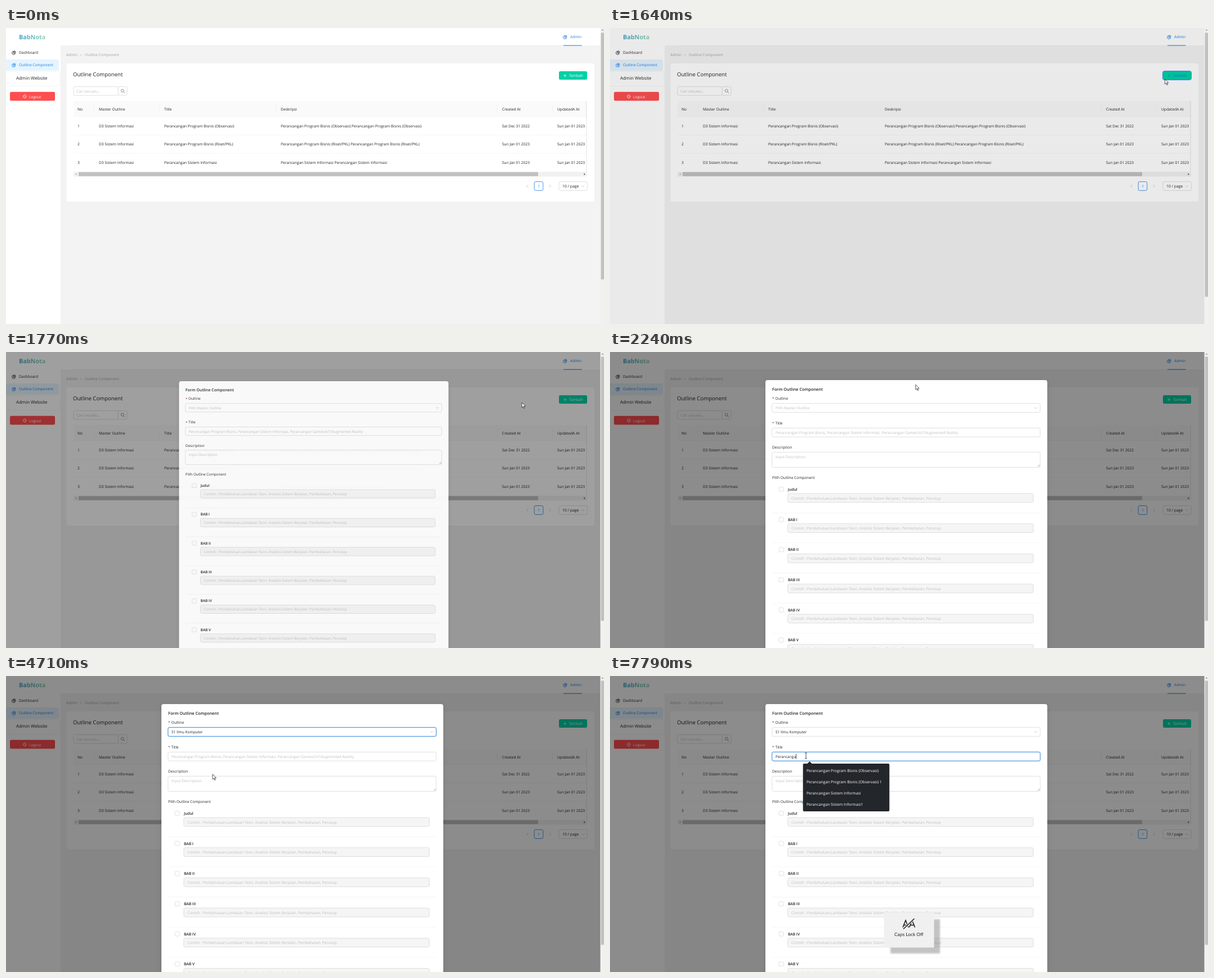
These frames come from a looping animation (1062 px wide and 527 px high, 7990 ms). An HTML page:

```html
<!DOCTYPE html>
<html lang="id">
<head>
<meta charset="utf-8">
<title>Outline Component</title>
<style>
  html, body { margin: 0; width: 100%; height: 100%; overflow: hidden; background: #fff; }
  svg { display: block; width: 100vw; height: 100vh; }
  text { font-family: "Open Sans", "Noto Sans", sans-serif; text-rendering: geometricPrecision; white-space: pre; }
</style>
</head>
<body>
<svg id="stage" viewBox="0 0 1062 527"></svg>
<script>
const LOOP = 7990;
const BLUE = '#1a7fe8', INK = '#222', FAINT = '#bfbfbf', BORDER = '#d9d9d9';

// Markup helpers; text is placed by its left edge and the middle of its capitals.
const text = (x, y, str, { size = 6.6, fill = INK, weight = 400, extra = '' } = {}) =>
  `<text x="${x}" y="${y + size * 0.36}" font-size="${size}" font-weight="${weight}" fill="${fill}" ${extra}>${str}</text>`;
const rect = (x, y, w, h, fill, r = 0, extra = '') =>
  `<rect x="${x}" y="${y}" width="${w}" height="${h}" rx="${r}" fill="${fill}" ${extra}/>`;
const outline = (x, y, w, h, stroke = BORDER, fill = '#fff', extra = '') =>
  rect(x, y, w, h, fill, 2.5, `stroke="${stroke}" stroke-width=".8" ${extra}`);
const path = (d, stroke, width = 0.8, fill = 'none') =>
  `<path d="${d}" stroke="${stroke}" stroke-width="${width}" fill="${fill}"/>`;
const group = (id, body, extra = '') => `<g id="${id}" ${extra}>${body}</g>`;
const pie = (x, y, color) =>
  path(`M${x - 0.6} ${y - 2.5}A3 3 0 1 0 ${x + 2.6} ${y + 1}H${x - 0.6}Z`, color, 0.9) +
  path(`M${x + 0.8} ${y - 3.2}A3 3 0 0 1 ${x + 3.2} ${y - 0.6}H${x + 0.8}Z`, color, 0.8);
const chevron = (x, y) => path(`M${x - 2.3} ${y - 1.2}l2.3 2.5l2.3 -2.5`, '#b5b5b5', 0.7);

function sidebar() {
  return rect(0, 0, 97, 527, '#fff') +
    text(23, 16, 'BabNota', { size: 10.8, weight: 700, fill: 'url(#brand)' }) +
    pie(14, 43.8, INK) + text(23, 43.8, 'Dashboard') +
    rect(-5, 56, 99, 20, '#e6f4ff', 4) +
    pie(14, 66, BLUE) + text(23, 66, 'Outline Component', { fill: BLUE }) +
    rect(-5, 77.5, 101, 26, '#fff', 3, 'stroke="#f1f1f1" stroke-width=".8"') +
    text(18, 89, 'Admin Website', { size: 7.9, weight: 500 }) +
    rect(7, 113.8, 80, 15.8, '#ff4d4f', 2.5) +
    path('M35.7 120a2.9 2.9 0 1 0 0 3.8M33 121.9h4', '#fff', 0.9) +
    text(41, 122.2, 'Logout', { fill: '#fff' });
}

function header() {
  return rect(97, 0, 960, 31, '#fff') + rect(120, 30.8, 902, 0.7, '#ececec') +
    pie(993, 16, BLUE) + text(1002, 16, 'Admin', { fill: BLUE }) +
    rect(990, 30.6, 32.5, 1, BLUE);
}

function table() {
  const columns = [127, 165, 281, 488, 881, 979];
  const titles = ['No', 'Master Outline', 'Title', 'Deskripsi', 'Created At', 'UpdatedA At'];
  const subjects = ['Perancangan Program Bisnis (Observasi)', 'Perancangan Program Bisnis (Riset/PKL)', 'Perancangan Sistem Informasi'];
  let out = rect(120, 130, 912, 28, '#fafafa');
  titles.forEach((title, i) => {
    out += text(columns[i], 144.5, title, { size: 6.7, weight: 500 });
    if (i) out += rect(columns[i] - 8.7, 137, 0.6, 15, '#ececec');
  });
  subjects.forEach((subject, row) => {
    const y = 174.5 + row * 32.6;
    const cells = [row + 1, 'D3 Sistem Informasi', subject, `${subject} ${subject}`,
      row ? 'Sun Jan 01 2023' : 'Sat Dec 31 2022', 'Sun Jan 01 2023'];
    cells.forEach((cell, i) => { out += text(columns[i], y, cell); });
    out += rect(120, y - 17, 912, 0.6, '#f0f0f0');
  });
  return out + rect(1030, 130, 2, 126, '#000', 0, 'opacity=".05"') +
    rect(120, 256, 912, 8.5, '#f1f1f1') + rect(129, 256.6, 816, 7.2, '#c1c1c1') +
    '<path d="M125.3 258.6v3.4l-2 -1.7z" fill="#a3a3a3"/><path d="M1026.5 258.4v3.8l2.3 -1.9z" fill="#505050"/>';
}

function card() {
  return rect(107.5, 63, 937.5, 246, '#fff', 3) +
    text(119, 82.5, 'Outline Component', { size: 9.6, weight: 500 }) +
    rect(982, 77, 50, 15, '#00d1a7', 2.5) +
    group('buttonHover', rect(981.6, 76.6, 50.8, 15.8, 'none', 2.8, `stroke="${BLUE}" stroke-width=".9"`)) +
    path('M990 84.8h5.4M992.7 82.1v5.4', 'currentColor', 0.7) +
    text(1000, 85, 'Tambah', { fill: 'currentColor' }) +
    outline(119.9, 104.4, 79.4, 15.6) + text(125, 112.8, 'Cari sesuatu...', { fill: FAINT }) +
    outline(199.3, 104.4, 15.8, 15.6) +
    path('M208.6 113.6l2.4 2.4M209.3 111.6a2.5 2.5 0 1 0 -5 0a2.5 2.5 0 1 0 5 0', '#777', 0.8) +
    table() +
    path('M927.5 279.3l-3 2.4l3 2.4', FAINT, 0.7) + path('M964.5 279.3l3 2.4l-3 2.4', FAINT, 0.7) +
    outline(938.2, 273.6, 15.6, 15.8, BLUE) + text(944.2, 282, '1', { fill: BLUE, weight: 500 }) +
    outline(982, 273.6, 50.3, 15.8) + text(988, 282, '10 / page', { size: 6.8 }) + chevron(1024.5, 281.6);
}

function page() {
  return rect(0, 0, 1062, 527, '#f3f3f3') + header() + sidebar() +
    text(107, 48, 'Admin', { fill: '#9ba5a3' }) + text(131.5, 48, '&gt;', { fill: '#9ba5a3', size: 5.6 }) +
    text(140, 48, 'Outline Component', { fill: '#9ba5a3' }) + card();
}

function scrollbar() {
  return rect(1055.5, 0, 6.5, 527, '#f1f1f1') +
    '<path d="M1057.6 4.6h3.8l-1.9 -2.4z" fill="#8a8a8a"/>' +
    rect(1056.6, 8.5, 5.4, 439, '#c1c1c1', 0, 'id="thumb"');
}

function componentRow(name, i) {
  const y = 244.4 + i * 53.7;
  return rect(300.2, y - 3.9, 7.8, 7.8, '#fff', 1.5, `stroke="${BORDER}" stroke-width=".8"`) +
    text(316, y, name, { size: 6.7, weight: 600 }) +
    outline(315.8, y + 7.6, 436, 15.8, BORDER, '#f5f5f5') +
    text(322, y + 15.8, 'Contoh : Pendahuluan,Landasan Teori, Analisis Sistem Berjalan, Pembahasan, Penutup', { fill: FAINT }) +
    rect(288, y + 41.4, 476, 0.6, '#efefef');
}

function modal() {
  const field = (y, h, id) => outline(287.8, y, 476.2, h) +
    (id ? group(id, outline(287.8, y, 476.2, h, BLUE, 'none') +
      rect(287, y - 0.8, 477.8, h + 1.6, 'none', 3, `stroke="${BLUE}" stroke-width=".8" opacity=".15"`)) : '');
  const required = (y, label) => text(288, y + 0.4, '*', { fill: '#a33' }) + text(293.5, y, label);
  return rect(276, 50, 500.5, 560, '#fff', 4, 'filter="url(#soft)"') +
    text(288, 66.2, 'Form Outline Component', { size: 7.3, weight: 600 }) +
    required(82.4, 'Outline') + field(91.6, 15.8, 'selectFocus') +
    text(294, 100, 'Pilih Master Outline', { fill: FAINT, extra: 'id="selectText"' }) + chevron(756, 99.6) +
    required(126.4, 'Title') + field(135.4, 15.8, 'titleFocus') +
    text(294, 143.8, '', { extra: 'id="titleText"' }) + rect(294, 138.4, 0.7, 9.6, '#111', 0, 'id="caret"') +
    text(288, 169.8, 'Description') + field(178.4, 27) +
    text(294, 186.8, 'Input Description', { fill: FAINT }) +
    path('M759.5 204l3.5 -3.5M761.7 204l1.3 -1.3', '#777', 0.6) +
    text(288, 223.6, 'Pilih Outline Component') +
    ['Judul', 'BAB I', 'BAB II', 'BAB III', 'BAB IV', 'BAB V'].map(componentRow).join('');
}

function dropdown() {
  const options = ['D3 Sistem Informasi', 'D3 Manajemen Informatika', 'S1 Sistem Informasi', 'S1 Ilmu Komputer'];
  return rect(288, 109.5, 476, 73, '#fff', 4, 'filter="url(#soft)"') +
    options.map((option, i) => text(294, 120.5 + i * 17, option)).join('');
}

function capsNotice() {
  return rect(498, 433, 88, 61, '#888', 0, 'opacity=".5" filter="url(#blur)"') +
    rect(486.5, 421, 89, 62.5, '#f0f0f0') +
    path('M520 447.5l5 -12.5l5 12.5M521.8 443.5h6.4M531.5 447.5l5 -12.5l5 12.5M533.3 443.5h6.4', '#111', 1.5) +
    path('M520.5 451L540.5 432', '#f0f0f0', 3.2) + path('M521 450.5L540.5 432', '#111', 1.4) +
    text(505, 459.8, 'Caps Lock Off', { size: 8.4, extra: 'style="font-family:Lato,sans-serif"' });
}

const stage = document.getElementById('stage');
stage.innerHTML = `<defs>
  <linearGradient id="brand"><stop stop-color="#3ba4c6"/><stop offset="1" stop-color="#9bd3b8"/></linearGradient>
  <filter id="soft" x="-10%" y="-20%" width="120%" height="140%"><feDropShadow dx="0" dy="3" stdDeviation="4" flood-opacity=".13"/></filter>
  <filter id="blur"><feGaussianBlur stdDeviation="1.8"/></filter></defs>` +
  group('page', page()) + rect(0, 0, 1062, 527, '#000', 0, 'id="mask"') + scrollbar() +
  group('modal', modal()) + group('dropdown', dropdown()) + group('suggestions', '') + group('caps', capsNotice()) +
  group('pointer', path('M0 0V9L2.1 7.1L3.6 10.5L5 9.9L3.5 6.6H6.3Z', '#111', 0.7, '#fff')) +
  group('beam', path('M-1.8 -5H1.8M0 -5V5M-1.8 5H1.8', '#222', 0.8));

const el = Object.fromEntries([...stage.querySelectorAll('[id]')].map(node => [node.id, node]));

const clamp = v => Math.min(1, Math.max(0, v));
const ramp = (t, start, duration) => clamp((t - start) / duration);
const pulse = (t, start, end, fade) => ramp(t, start, fade) - ramp(t, end, fade);
const show = (node, opacity) => {
  node.setAttribute('opacity', opacity);
  node.style.display = opacity > 0 ? '' : 'none';
};
const setText = (node, str, fill) => {
  if (node.textContent !== str) node.textContent = str;
  node.setAttribute('fill', fill);
};

// time, x, y
const cursorPath = [
  [230, 1036, 477], [600, 1012, 245], [960, 992, 95], [1030, 992, 95], [1250, 988, 90], [1640, 986, 91],
  [1770, 917, 90], [2240, 543, 58], [2440, 505, 80], [2900, 505, 80], [3350, 420, 99], [3670, 416, 99],
  [4100, 392, 135], [4500, 367, 175], [4710, 367, 175], [5150, 357, 147], [5660, 357, 147], [5870, 348, 142]
];
function cursorAt(t) {
  const next = cursorPath.findIndex(key => key[0] > t);
  if (next < 0) return cursorPath.at(-1).slice(1);
  const [t0, x0, y0] = cursorPath[Math.max(0, next - 1)], [t1, x1, y1] = cursorPath[next];
  const u = t1 > t0 ? (t - t0) / (t1 - t0) : 0;
  return [x0 + (x1 - x0) * u, y0 + (y1 - y0) * u];
}

const typed = 'Perancanga';
const keyTimes = [6600, 6870, 6970, 7080, 7210, 7330, 7460, 7570, 7680, 7790];
const titleHint = 'Perancangan Program Bisnis, Perancangan Sistem Informasi, Perancangan Games/IoT/Augmented Reality';
const history = ['Flutter Combo Laravel', 'Babnota', 'Babnota Admin', '1', '2', 'Dashboard Reconciliation (Dockerize App)'];
const matches = ['Perancangan Program Bisnis (Observasi)', 'Perancangan Program Bisnis (Observasi) 1',
  'Perancangan Sistem Informasi', 'Perancangan Sistem Informasi1'];

let shownList;
function setSuggestions(list) {
  if (list === shownList) return;
  shownList = list;
  el.suggestions.innerHTML = list ? '<path d="M350 156.5l4.5 -4.5l4.5 4.5z" fill="#23262a"/>' +
    rect(342.7, 156, 153.5, list.length * 20 + 5, '#23262a', 2) +
    list.map((item, i) => text(349, 169 + i * 20, item, { size: 6.8, fill: '#fff' })).join('') : '';
}

function draw(t) {
  const hover = pulse(t, 1060, 1650, 80);
  show(el.buttonHover, hover);
  el.page.style.color = hover > 0.5 ? BLUE : '#fff';

  show(el.mask, 0.45 * ramp(t, 1604, 200));
  el.thumb.setAttribute('height', t < 1600 ? 439 : 470);

  // The dialog grows out of the point that was clicked.
  const zoom = 1 - (1 - ramp(t, 1683, 200)) ** 5;
  show(el.modal, zoom);
  el.modal.setAttribute('transform', `translate(987 94) scale(${0.2 + 0.8 * zoom}) translate(-987 -94)`);

  show(el.selectFocus, pulse(t, 3150, 5220, 200));
  const open = pulse(t, 3500, 4510, 180);
  show(el.dropdown, open);
  el.dropdown.setAttribute('transform', `translate(0 109.5) scale(1 ${0.8 + 0.2 * open}) translate(0 -109.5)`);
  const chosen = t >= 4500;
  setText(el.selectText, chosen ? 'S1 Ilmu Komputer' : 'Pilih Master Outline', chosen ? INK : FAINT);

  show(el.titleFocus, ramp(t, 5130, 250));
  const value = typed.slice(0, keyTimes.filter(time => t >= time).length);
  setText(el.titleText, value || titleHint, value ? INK : FAINT);
  const blinkOn = t >= 5330 && (value || Math.floor((t - 5335) / 530) % 2 === 0);
  show(el.caret, blinkOn ? 1 : 0);
  el.caret.setAttribute('x', 294 + (value ? el.titleText.getComputedTextLength() : -0.4));
  setSuggestions(t < 5320 ? null : value ? matches : history);
  show(el.caps, ramp(t, 6780, 80));

  const [x, y] = cursorAt(t);
  const overTitle = t > 4710 && y < 151;
  show(el.pointer, t >= 230 && !overTitle ? 1 : 0);
  show(el.beam, overTitle ? 1 : 0);
  for (const node of [el.pointer, el.beam]) node.setAttribute('transform', `translate(${x} ${y})`);
}

const start = performance.now();
function tick() {
  draw((performance.now() - start) % LOOP);
  requestAnimationFrame(tick);
}
tick();
</script>
</body>
</html>
```
